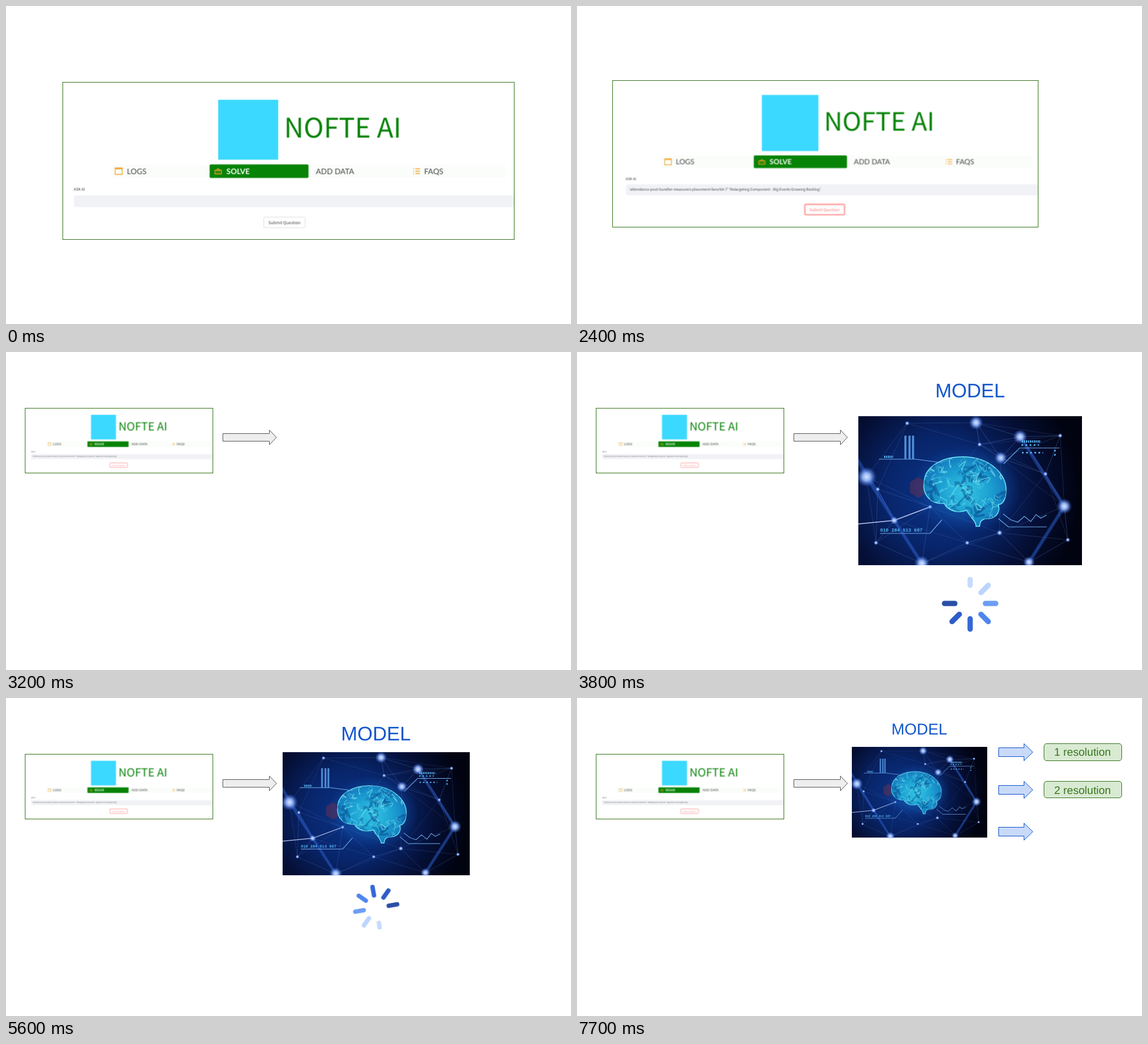
These frames come from a looping animation (960 px wide and 540 px high, 8 s). An HTML page:

```html
<!DOCTYPE html>
<html lang="en">
<head>
<meta charset="utf-8">
<title>Question to resolutions</title>
<style>
html, body { margin: 0; width: 100%; height: 100%; overflow: hidden; background: #fff; }
#stage { display: block; width: 960px; height: 540px; text-rendering: geometricPrecision; }
#stage * { transform-box: view-box; transform-origin: 0 0; }
.arial { font-family: "Liberation Sans", Arial, sans-serif; text-anchor: middle; }
.app { font-family: "Noto Sans CJK JP", "Noto Sans CJK SC", "Noto Sans CJK", sans-serif; }
.nav { font: 13px Lato, sans-serif; fill: #444; }
.icon { fill: none; stroke: #f5a32a; stroke-width: 1.3; }
.out { fill: #c9daf8; stroke: #1155cc; }
.card rect { fill: #d9ead3; stroke: #38761d; }
.card text { font-size: 18.67px; fill: #38761d; }

.step { animation: 8s step-end infinite; }
#panel { animation-name: panel; }
#frame { animation-name: frame; fill: none; stroke: #38761d; }
#page { animation-name: page; }
#idle { animation-name: idle; }
#query, #sent { animation-name: from1200; }
#sent rect { animation-name: ring; }
#ask { animation-name: from3200; }
#photo { animation-name: photo; }
#title { animation-name: title; }
#spinner { animation-name: spinner; }
#out1 { animation-name: from6000; }
#card1 { animation-name: from6500; }
#out2 { animation-name: from6700; }
#card2 { animation-name: from7200; }
#out3 { animation-name: from7700; }

@keyframes panel {
  0% { transform: translate(96.5px, 129.5px); }
  30% { transform: translate(60.5px, 126.5px) scale(.9426, .9326); }
  32.5% { transform: translate(44.5px, 109.5px) scale(.807, .805); }
  35% { transform: translate(32.5px, 95.5px) scale(.6623, .6554); }
  37.5%, 100% { transform: translate(32.5px, 95.5px) scale(.4159, .412); }
}
@keyframes frame {
  0% { x: 96.5px; y: 129.5px; width: 767px; height: 267px; }
  30% { x: 60.5px; y: 126.5px; width: 723px; height: 249px; }
  32.5% { x: 44.5px; y: 109.5px; width: 619px; height: 215px; }
  35% { x: 32.5px; y: 95.5px; width: 508px; height: 175px; }
  37.5%, 100% { x: 32.5px; y: 95.5px; width: 319px; height: 110px; }
}
@keyframes page { 0% { transform: none; } 15%, 100% { transform: translate(5px, -3px); } }
@keyframes idle { 0% { opacity: 1; } 15%, 100% { opacity: 0; } }
@keyframes ring {
  0% { stroke: #ffa9a9; stroke-width: 2.8px; }
  32.5%, 100% { stroke: #ff5c5c; stroke-width: 1.4px; }
}
@keyframes photo {
  0% { opacity: 0; transform: translate(478px, 109px); }
  47.5% { opacity: 1; transform: translate(478px, 109px); }
  70% { opacity: 1; transform: translate(470px, 92px) scale(.8368, .8261); }
  72.5%, 100% { opacity: 1; transform: translate(467px, 83px) scale(.6053, .6087); }
}
@keyframes title {
  0% { opacity: 0; transform: translate(668px, 77px); }
  47.5% { opacity: 1; transform: translate(668px, 77px); }
  70% { opacity: 1; transform: translate(628.5px, 72px); }
  72.5%, 100% { opacity: 1; transform: translate(581.7px, 61.5px) scale(.8); }
}
@keyframes spinner {
  0% { opacity: 0; transform: translate(668px, 427px); }
  47.5% { opacity: 1; transform: translate(668px, 427px); }
  55% { opacity: 1; transform: translate(668px, 427px) rotate(57deg); }
  62.5% { opacity: 1; transform: translate(668px, 427px) rotate(113deg); }
  70% { opacity: 1; transform: translate(629px, 356.5px) scale(.83) rotate(170deg); }
  72.5% { opacity: 1; transform: translate(582px, 273px) scale(.605) rotate(189deg); }
  75%, 100% { opacity: 0; }
}
@keyframes from1200 { 0% { opacity: 0; } 15%, 100% { opacity: 1; } }
@keyframes from3200 { 0% { opacity: 0; } 40%, 100% { opacity: 1; } }
@keyframes from6000 { 0% { opacity: 0; } 75%, 100% { opacity: 1; } }
@keyframes from6500 { 0% { opacity: 0; } 81.25%, 100% { opacity: 1; } }
@keyframes from6700 { 0% { opacity: 0; } 83.75%, 100% { opacity: 1; } }
@keyframes from7200 { 0% { opacity: 0; } 90%, 100% { opacity: 1; } }
@keyframes from7700 { 0% { opacity: 0; } 96.25%, 100% { opacity: 1; } }
</style>
</head>
<body>
<svg id="stage" viewBox="0 0 960 540" xmlns="http://www.w3.org/2000/svg">
  <defs>
    <clipPath id="panelClip"><rect width="767" height="267"/></clipPath>
    <clipPath id="photoClip"><rect width="380" height="253"/></clipPath>
    <path id="brainShape" d="M112 112C112 88 140 68 180 69C225 70 252 100 251 125C251 140 246 150 238 150C242 165 232 175 216 174C208 176 207 180 206 187L200 187C200 178 192 174 184 160C165 166 150 158 146 148C125 150 108 135 112 112Z"/>
    <clipPath id="brainClip"><use href="#brainShape"/></clipPath>
    <radialGradient id="night" gradientUnits="userSpaceOnUse" cx="140" cy="130" r="235">
      <stop offset="0" stop-color="#0a3488"/><stop offset=".4" stop-color="#08256a"/>
      <stop offset=".7" stop-color="#051038"/><stop offset="1" stop-color="#010310"/>
    </radialGradient>
    <radialGradient id="brainFill">
      <stop offset="0" stop-color="#34c6e4"/><stop offset=".65" stop-color="#1b9dd0"/><stop offset="1" stop-color="#157fc0"/>
    </radialGradient>
    <radialGradient id="halo">
      <stop offset="0" stop-color="#28b4f0" stop-opacity=".7"/><stop offset="1" stop-color="#1465d8" stop-opacity="0"/>
    </radialGradient>
    <radialGradient id="node">
      <stop offset="0" stop-color="#dbe8ff"/><stop offset=".4" stop-color="#9cbcff" stop-opacity=".9"/>
      <stop offset="1" stop-color="#3a70f0" stop-opacity="0"/>
    </radialGradient>
    <path id="outArrow" d="M716.5-7.5H759.5V-14.5L774.5 0L759.5 14.5V7.5H716.5Z"/>
  </defs>

  <g id="panel" class="step" clip-path="url(#panelClip)">
    <g id="page" class="step app">
      <rect x="264" y="29.5" width="102" height="102" fill="#3bd9ff"/>
      <text x="376" y="94" font-size="46" fill="#078307">NOFTE AI</text>
      <rect x="81" y="140" width="671" height="22" fill="#fafdfa"/>
      <rect x="249.5" y="139.5" width="168" height="23" rx="2" fill="#078307"/>
      <g class="icon">
        <path d="M89 145.5h12v11h-12zM89 147h12"/>
        <path d="M258.5 149.5h11v6h-11zM261 149.5q3-5 6 0M261.5 152h1.5m2 0h1.5"/>
        <path d="M595.5 147h1.5m2 0h8m-11.5 4h1.5m2 0h8m-11.5 4h1.5m2 0h8"/>
      </g>
      <g class="nav">
        <text x="109" y="155.5">LOGS</text>
        <text x="278" y="155.5" font-weight="bold" style="fill:#fff">SOLVE</text>
        <text x="430" y="155.5">ADD DATA</text>
        <text x="614" y="155.5">FAQS</text>
      </g>
      <text x="18.5" y="184" font-size="6.4" fill="#333">ASK AI</text>
      <rect x="19" y="192" width="780" height="20" rx="3" fill="#f0f2f6"/>
      <text id="query" class="step" x="24.7" y="204" font-size="6.5" fill="#444">'attendance-pool-bundler-measurers:placement-farorbit-7' 'Retargeting Component - Big Events Growing Backlog'</text>
      <g font-size="7" text-anchor="middle">
        <g id="idle" class="step">
          <rect x="341.5" y="229" width="70.5" height="18" rx="2.5" fill="#fff" stroke="#dcdde0"/>
          <text x="376.7" y="240.7" fill="#444">Submit Question</text>
        </g>
        <g id="sent" class="step">
          <rect class="step" x="341.5" y="228.5" width="71.5" height="19" rx="2.5" fill="#fff"/>
          <text x="377" y="240.7" fill="#ff7070">Submit Question</text>
        </g>
      </g>
    </g>
  </g>
  <rect id="frame" class="step"/>

  <path id="ask" class="step" d="M368.5 138.5H447.5V132.5L459.5 145L447.5 157.5V151.5H368.5Z" fill="#eee" stroke="#595959"/>

  <g id="photo" class="step">
    <g clip-path="url(#photoClip)">
      <rect width="380" height="253" fill="url(#night)"/>
      <g id="net"></g>
      <ellipse cx="184" cy="124" rx="92" ry="76" fill="url(#halo)"/>
      <path d="M88 112l14-9 14 9v18l-14 9-14-9z" fill="#6b3050" opacity=".5"/>
      <use href="#brainShape" fill="url(#brainFill)" stroke="#6fe9f8" stroke-width="1.5"/>
      <g id="folds" clip-path="url(#brainClip)" fill="none" stroke-linecap="round"></g>
      <g fill="none" stroke="#6ea8ea" stroke-width="1.2">
        <path d="M35 73H97L142 79M342 54H274L247 81M37 199H122L142 176M320 188H255L238 174"/>
        <path d="M246 166l13 10 12 4 11-10 11 9 9-12 8 6 10-5"/>
        <path d="M80 33v40m7-40v40m6-40v40" stroke="#4f8ed8" stroke-width="3.5"/>
        <path d="M44 69h15M278 43h32" stroke="#58b4f0" stroke-width="4" stroke-dasharray="2 1.5"/>
        <path d="M277 49h30M278 62h36M334 57v12" stroke="#58b4f0" stroke-width="2.5" stroke-dasharray="3 4"/>
      </g>
      <text x="37" y="196" font-family="Liberation Mono, monospace" font-size="8" font-weight="bold" fill="#4fb5f5">010 284 513 607</text>
    </g>
  </g>
  <text id="title" class="step arial" font-size="33.33" fill="#1155cc">MODEL</text>
  <g id="spinner" class="step" stroke-width="9" stroke-linecap="round"></g>

  <use id="out1" class="step out" href="#outArrow" y="92"/>
  <use id="out2" class="step out" href="#outArrow" y="156"/>
  <use id="out3" class="step out" href="#outArrow" y="227"/>
  <g id="card1" class="step card arial">
    <rect x="793.5" y="77.5" width="132" height="29" rx="4.5"/><text x="859" y="98">1 resolution</text>
  </g>
  <g id="card2" class="step card arial">
    <rect x="793.5" y="141.5" width="132" height="28" rx="4.5"/><text x="859" y="162.5">2 resolution</text>
  </g>
</svg>
<script>
const add = (id, tag, attrs) => {
  const el = document.createElementNS("http://www.w3.org/2000/svg", tag);
  for (const key in attrs) el.setAttribute(key, attrs[key]);
  document.getElementById(id).append(el);
};

let seed = 11;
const random = () => (seed = seed * 16807 % 2147483647) / 2147483647;

// Network of glowing nodes: x, y, radius
const nodes = [
  [14, 103, 17], [200, 11, 12], [242, 71, 11], [275, 35, 12], [350, 153, 13], [108, 250, 13],
  [290, 248, 10], [61, 177, 7], [122, 154, 4], [33, 124, 4], [83, 12, 4], [206, 48, 4],
  [343, 33, 4], [356, 210, 4], [240, 198, 5], [185, 215, 4], [318, 98, 4], [30, 215, 4]
];
add("net", "path", {
  d: "M14 103L108 250M350 153L290 248M275 35L350 153M-10 60L61 177",
  stroke: "#2558c8", "stroke-opacity": .5, "stroke-width": 6
});
nodes.forEach(([x1, y1], i) => nodes.slice(i + 1).forEach(([x2, y2]) => {
  const gap = Math.hypot(x2 - x1, y2 - y1);
  if (gap < 145) add("net", "line", { x1, y1, x2, y2, stroke: "#6486d4", "stroke-opacity": .5 - gap / 450 });
}));
add("net", "path", { d: "M0 183L61 177L122 154", stroke: "#b9c4ee", "stroke-width": 1.5, fill: "none" });
for (const [cx, cy, r] of nodes) add("net", "circle", { cx, cy, r, fill: "url(#node)" });

// Folds of the brain: dark furrows first, then bright curls over them
for (let i = 0; i < 110; i++) {
  const furrow = i < 40;
  const x = 110 + 140 * random(), y = 70 + 108 * random();
  const turn = () => (20 * random() - 10).toFixed(1);
  add("folds", "path", {
    d: `M${x} ${y}q${turn()} ${turn()} ${turn()} ${turn()}t${turn()} ${turn()}`,
    stroke: furrow ? "#0c5c9c" : "#86f0f6",
    "stroke-opacity": .3 + .4 * random(),
    "stroke-width": furrow ? 3 + 2 * random() : .7 + random()
  });
}

["#2a4fa8", "#2f5cc8", "#3467d8", "#4f86ee", "#6d9ef5", "#bcd5fc", "#c6dbfc"].forEach((stroke, i) =>
  add("spinner", "line", { x1: i === 6 ? 31 : 26, x2: i === 6 ? 40.5 : 43.5, stroke, transform: `rotate(${180 - 45 * i})` }));
</script>
</body>
</html>
```
